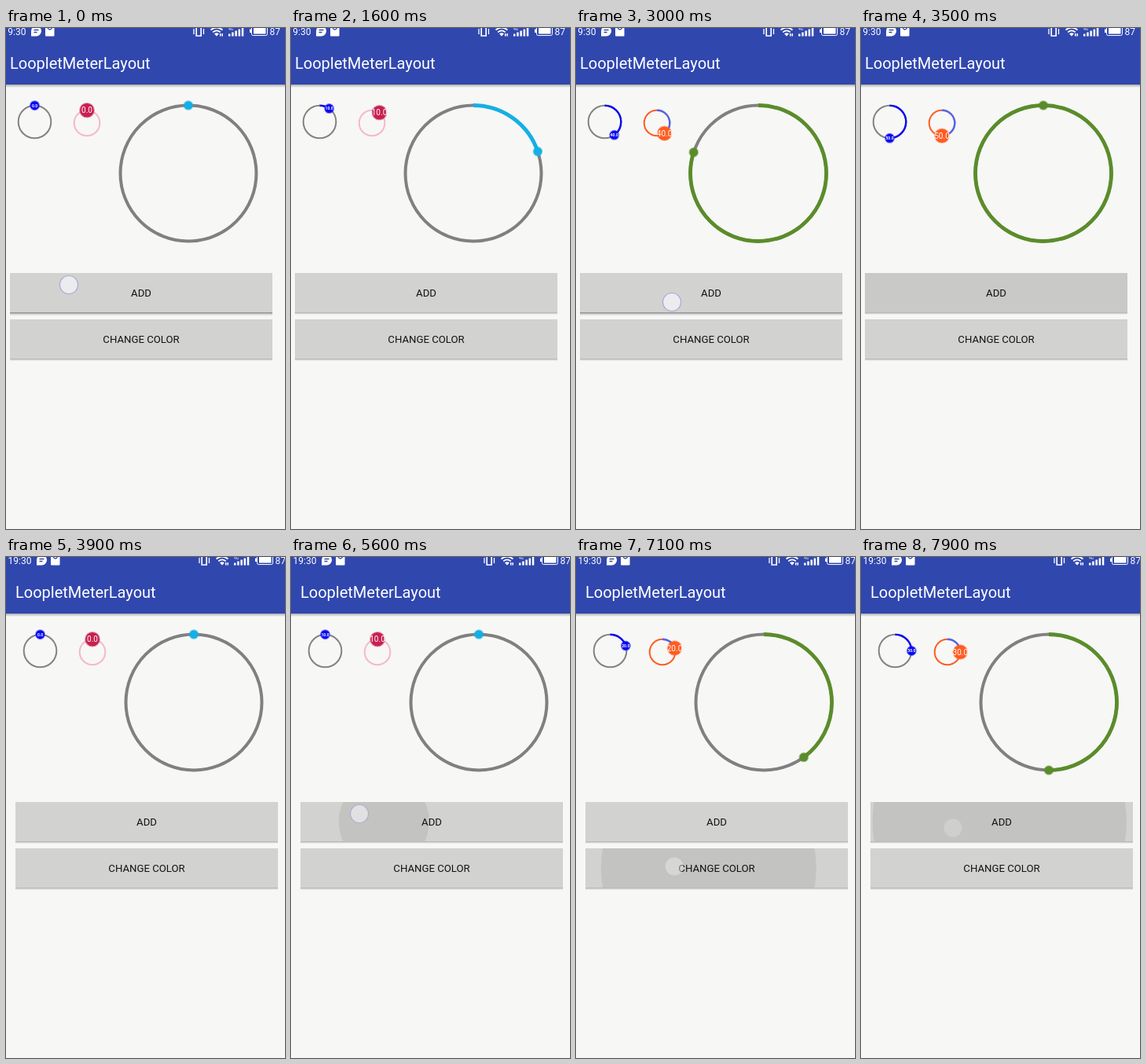
Animation of 355 by 638 pixels, one loop 8 s. Source, as an HTML page:

```html
<!DOCTYPE html>
<html lang="en">
<head>
<meta charset="utf-8">
<title>Circular progress demo</title>
<style>
  html, body { margin: 0; width: 100%; height: 100%; overflow: hidden; background: #f7f7f6; }
  svg { display: block; width: 355px; height: 638px; font-family: Roboto, sans-serif; }
  .btn { fill: #d2d2d0; }
  .label { font-size: 13.2px; fill: #141414; text-anchor: middle; }
  .ripple { fill: #000; }
  .arc, .track { fill: none; }
  .value { text-anchor: middle; fill: #fff; }
  .line { fill: none; stroke: #fff; }
</style>
</head>
<body>
<svg viewBox="0 0 355 638">
  <defs>
    <linearGradient id="fall" x2="0" y2="1">
      <stop offset="0" stop-color="#000" stop-opacity=".3"/>
      <stop offset="1" stop-color="#000" stop-opacity="0"/>
    </linearGradient>
    <clipPath id="clipAdd"><rect x="12" y="312" width="334" height="50"/></clipPath>
    <clipPath id="clipColor"><rect x="12" y="371" width="334" height="50"/></clipPath>
  </defs>
  <rect width="355" height="638" fill="#f7f7f6"/>
  <rect width="355" height="72" fill="#3047ae"/>
  <rect y="72" width="355" height="4" fill="url(#fall)"/>

  <g id="screen">
    <!-- status bar -->
    <g fill="#fff" font-size="12">
      <text x="2.5" y="8.5">19:30</text>
      <path d="M39 10.500V4a6.500 6.500 0 1 1 6.500 6.500z"/>
      <path d="M42.500 2.500h6M42.500 5.500h4" stroke="#3047ae" stroke-width="1.300"/>
      <rect x="57" y="-3" width="11.500" height="13.500" rx="1"/>
      <path d="M59.500 -1q3.300 6 6.600 0" fill="none" stroke="#3047ae" stroke-width="1.300"/>
      <path class="line" d="M249.200 -2h6v12h-6z" stroke-width="1.700"/>
      <path class="line" d="M246 1v7M258.500 1v7" stroke-width="1.300"/>
      <path class="line" d="M267.500 2.500q7.500 -6 15 0M270.200 5.300q4.800 -4 9.600 0" stroke-width="1.700"/>
      <path d="M272 7.200q3 -2 6 0l-3 3.300zM279 7h1.500v3.500H279zM281.500 7h1.500v3.500h-1.500z"/>
      <path d="M290 7.500h2.500v3H290zM294.200 5.500h2.500v5h-2.500zM298.400 3.500h2.500v7h-2.500zM302.600 1.500h2.500v9h-2.500zM306.800 -1h2.500v11.500h-2.500z"/>
      <text x="290" y="2.500" font-size="5">4G</text>
      <rect class="line" x="319.500" y="-2" width="20" height="11.500" rx="2"/>
      <rect x="322" y="0" width="15.500" height="7.500"/>
      <rect x="317" y="1.500" width="2" height="4.500"/>
      <text x="342.500" y="8.500">87</text>
    </g>
    <text x="12" y="52" font-size="20" fill="#fff">LoopletMeterLayout</text>

    <g id="rings"></g>

    <rect id="lift" x="12" y="362" width="334" height="5" fill="url(#fall)"/>
    <rect x="12" y="362" width="334" height="3" fill="url(#fall)"/>
    <rect x="12" y="421" width="334" height="3" fill="url(#fall)"/>
    <rect class="btn" x="12" y="312" width="334" height="50"/>
    <rect class="btn" x="12" y="371" width="334" height="50"/>
    <g clip-path="url(#clipAdd)"><circle class="ripple" id="rippleAdd" cy="337"/></g>
    <g clip-path="url(#clipColor)"><circle class="ripple" id="rippleColor" cy="396"/></g>
    <text class="label" x="179" y="342">ADD</text>
    <text class="label" x="179" y="401">CHANGE COLOR</text>
    <g id="pointer">
      <circle r="11.500" fill="#ececee"/>
      <circle id="halo" r="11.500" fill="none" stroke="#a4a9d8" stroke-width="1.200"/>
    </g>
  </g>
</svg>
<script>
const LOOP = 8000, STEP = 100, GROW = 320;
const $ = id => document.getElementById(id);
const clamp = v => Math.max(0, Math.min(1, v));

// down: finger lands, up: click fires, out: ripple gone (ms after the click)
const tap = (kind, down, up, x, y, out = 450) => ({ kind, down, up, x, y, out });
const runs = [
  { start: 0, shift: -7, taps: [
    tap('Add', 0, 1300, 87, 327, 280),
    tap('Add', 1650, 1700, 87, 335, 350),
    tap('Color', 1900, 1940, 125, 394, 300),
    tap('Add', 2200, 2300, 120, 345, 320),
    tap('Add', 2550, 2640, 124, 347, 340),
    tap('Add', 2950, 3140, 129, 349, 650)
  ] },
  { start: 3900, shift: 0, taps: [
    tap('Add', 4900, 5600, 87, 327, 600),
    tap('Add', 6200, 6380, 87, 335),
    tap('Color', 6850, 7000, 125, 394, 500),
    tap('Add', 7500, 7740, 117, 345)
  ] }
];

// colours are [before, after] the colour change
const rings = [
  { x: 43.5, y: 119.5, r: 20.8, w: 2, max: 100, dot: 5.5, font: 5, bold: 700,
    track: ['#838383', '#838383'], arc: ['#0a0af0', '#0a0af0'], fill: ['#0a0af0', '#0a0af0'] },
  { x: 110, y: 121, r: 16.3, w: 2, max: 100, dot: 8.8, font: 10, bold: 400,
    track: ['#f4b9c9', '#ff5c20'], arc: ['#4f66f0', '#4f66f0'], fill: ['#c8204f', '#ff5c20'] },
  { x: 239, y: 185, r: 86.5, w: 4, max: 50, dot: 5.3, font: 0,
    track: ['#808080', '#808080'], arc: ['#14b0e5', '#5b8c2a'], fill: ['#14b0e5', '#5b8c2a'] }
];

function add(parent, name, attrs) {
  const el = document.createElementNS('http://www.w3.org/2000/svg', name);
  set(el, attrs);
  return parent.appendChild(el);
}
function set(el, attrs) {
  for (const key in attrs) el.setAttribute(key, attrs[key]);
}

for (const ring of rings) {
  const circle = { cx: ring.x, cy: ring.y, r: ring.r };
  ring.trackEl = add($('rings'), 'circle', { ...circle, class: 'track', 'stroke-width': ring.w });
  ring.arcEl = add($('rings'), 'circle', { ...circle, class: 'arc', 'stroke-width': ring.w * 1.2,
    pathLength: 100, transform: `rotate(-90 ${ring.x} ${ring.y})` });
  ring.dotEl = add($('rings'), 'circle', { r: ring.dot, 'stroke-opacity': .5, 'stroke-width': 2 });
  if (ring.font) ring.textEl = add($('rings'), 'text', { class: 'value',
    'font-size': ring.font, 'font-weight': ring.bold });
}

function drawRing(ring, value, label, theme) {
  const part = value / ring.max, turn = part * 2 * Math.PI;
  const x = ring.x + ring.r * Math.sin(turn), y = ring.y - ring.r * Math.cos(turn);
  set(ring.trackEl, { stroke: ring.track[theme] });
  set(ring.arcEl, { stroke: ring.arc[theme], 'stroke-dasharray': `${part * 100} 200` });
  set(ring.dotEl, { cx: x, cy: y, fill: ring.fill[theme], stroke: ring.fill[theme] });
  if (!ring.textEl) return;
  set(ring.textEl, { x, y: y + ring.font * .37 });
  ring.textEl.textContent = label.toFixed(1);
}

function drawRipple(kind, taps, t) {
  const last = taps.filter(p => p.kind === kind && p.up <= t).pop();
  const age = last ? t - last.up : Infinity;
  if (!last || age >= last.out) return set($('ripple' + kind), { r: 0 });
  const left = Math.max(0, .812 - .00377 * age), p = 1 - left * left;
  set($('ripple' + kind), {
    cx: last.x + (179 - last.x) * p,
    r: 169 * p,
    opacity: .07 * (1 - clamp((age - 180) / (last.out - 180)))
  });
}

function drawPointer(taps, t) {
  const last = taps.filter(p => p.down <= t).pop();
  const age = last ? t - last.up : Infinity;
  const held = age < 0;
  set($('pointer'), {
    transform: last ? `translate(${last.x} ${last.y})` : '',
    opacity: held ? 1 : .75 * clamp(1 - age / 260)
  });
  set($('halo'), { opacity: clamp(1 - age / 110) });
  set($('lift'), { opacity: last && last.kind === 'Add' && held && t - last.down < 200 ? .7 : 0 });
}

function draw(now) {
  let t = Math.floor(now % LOOP / STEP) * STEP;
  if (t >= 900 && t < 1400) t = 1300; // the first press holds still
  const run = t < runs[1].start ? runs[0] : runs[1];
  let value = 0, label = 0, theme = 0;
  for (const { kind, up } of run.taps) {
    if (up > t) break;
    if (kind === 'Color') { theme = 1; continue; }
    label += 10;
    value += 10 * (1 - Math.cos(Math.PI * clamp((t - up) / GROW))) / 2;
  }
  set($('screen'), { transform: `translate(${run.shift} 0)` });
  for (const ring of rings) drawRing(ring, value, label, theme);
  drawRipple('Add', run.taps, t);
  drawRipple('Color', run.taps, t);
  drawPointer(run.taps, t);
}

const begin = performance.now();
function tick() {
  draw(performance.now() - begin);
  requestAnimationFrame(tick);
}
tick();
</script>
</body>
</html>
```
